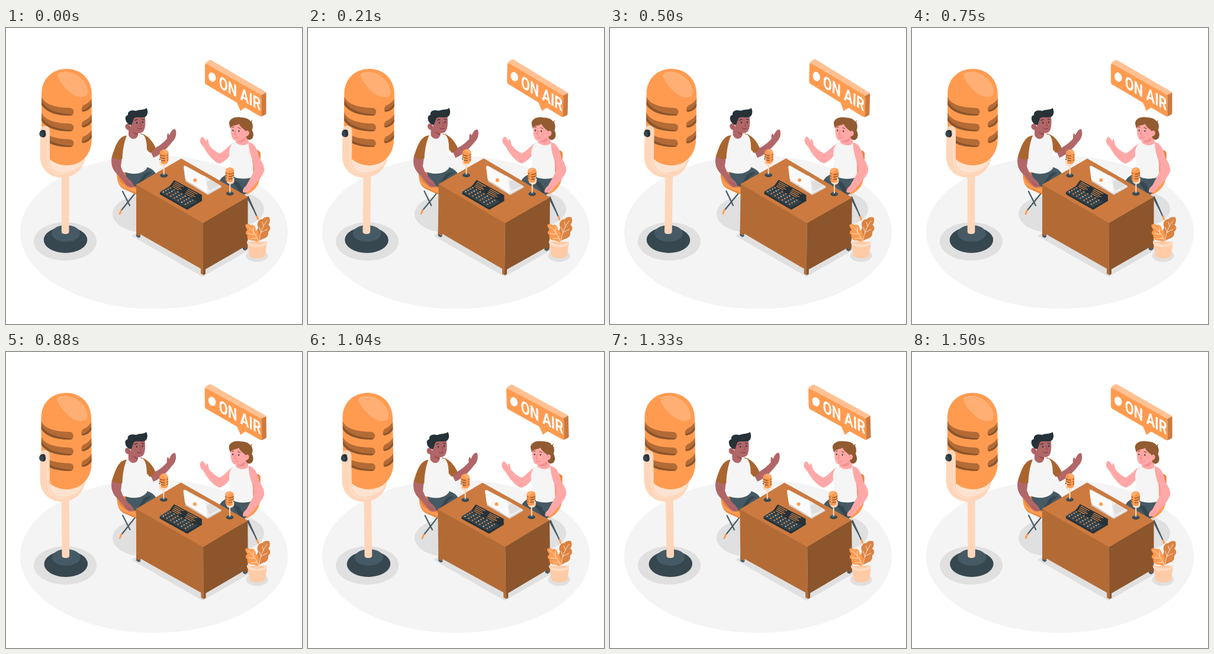
Recreate the animation shown at these times as an HTML page with a canvas. Size 500 px wide and 500 px high, loop 1.54 s.

```html
<!DOCTYPE html>
<html lang="en">
<head>
<meta charset="utf-8">
<title>On air</title>
<style>
  html, body { margin: 0; width: 100%; height: 100%; overflow: hidden; background: #fff; }
  canvas { display: block; width: 500px; height: 500px; }
</style>
</head>
<body>
<canvas id="stage"></canvas>
<script>
const canvas = document.getElementById('stage');
const ctx = canvas.getContext('2d');
const ratio = window.devicePixelRatio || 1;
canvas.width = canvas.height = 500 * ratio;

const LOOP = 1540, STEPS = 37;
const ORANGE = '#ff9b50', LIGHT = '#ffaf73', CREAM = '#ffd6ba';
const TOP = '#cc7a3f', SIDE = '#b36b36', DEEP = '#8c552c';
const INK = '#263238', SLATE = '#37474f', STEEL = '#455a64';
const SHADOW = '#e0e0e0', SHIRT = '#f5f5f5', SLEEVE = '#a9652f';
const MAN = '#b16668', MAN_DARK = '#9a4a4d', WOMAN = '#ffa8a7', WOMAN_DARK = '#f28f8f';

function fill(color, d) {
  ctx.fillStyle = color;
  ctx.fill(new Path2D(d));
}

function line(color, width, d) {
  ctx.strokeStyle = color;
  ctx.lineWidth = width;
  ctx.lineCap = ctx.lineJoin = 'round';
  ctx.stroke(new Path2D(d));
}

function oval(color, x, y, rx, ry = rx, angle = 0) {
  ctx.fillStyle = color;
  ctx.beginPath();
  ctx.ellipse(x, y, rx, ry, angle, 0, Math.PI * 2);
  ctx.fill();
}

function part(x, y, degrees, draw) {
  ctx.save();
  ctx.translate(x, y);
  ctx.rotate(degrees * Math.PI / 180);
  ctx.translate(-x, -y);
  draw();
  ctx.restore();
}

// Rises to 1 at a quarter, falls to -1 at three quarters, returns to 0.
function sway(p) {
  if (p < 0.25) return p * 4;
  return p < 0.75 ? 2 - p * 4 : p * 4 - 4;
}

function floor() {
  oval('#f4f4f4', 250, 345, 226, 129.5);
  oval(SHADOW, 100, 360.5, 53, 32.5);
  oval(SHADOW, 232, 314, 52, 31);
  oval(SHADOW, 385, 306, 51, 30);
  fill(SHADOW, 'M212 351 L332 420 L416 372 L296 302Z');
  oval(SHADOW, 424, 384.5, 18.5, 10.5);
}

function microphone() {
  oval(SLATE, 100.5, 358, 36.8, 22);
  oval(STEEL, 101, 347, 24, 14);
  fill(CREAM, 'M93.8 245 H106.5 V344 Q106.5 348 100.2 348 Q93.8 348 93.8 344Z');
  fill('#ffe3d0', 'M70 215 C70 238 82 249 98 249 C117 247 129 236 134 218Z');
  line('#ffc9a3', 2, 'M132 223 C127 240 112 248 94 248');
  fill(ORANGE, 'M60 112 C60 84 80 69 102.5 69 C126 69 144.7 86 144.7 112 V188 C144.7 214 127 232 103 232 C78 232 60 214 60 188Z');
  ctx.save();
  ctx.beginPath();
  ctx.rect(60, 60, 84.7, 180);
  ctx.clip();
  fill(LIGHT, 'M88 77 C96 71 115 73 128 86 C138 96 141 111 135 115 C129 118 119 117 110 110 C98 101 84 83 88 77Z');
  for (let i = 0; i < 3; i++) {
    ctx.save();
    ctx.translate(0, i * 26.5);
    fill(SIDE, 'M60 116 Q66 134 108 135 C117 136 116 148 108 148 Q72 148 60 130Z');
    fill(DEEP, 'M60 123 Q70 144 113 146 Q111 148 108 148 Q72 148 60 130Z');
    fill(SIDE, 'M146 117 Q141 126 132 130 C127 132 126 143 132 141 Q141 139 146 130Z');
    fill(DEEP, 'M146 125 Q138 138 128 139 Q129 142 132 141 Q141 139 146 130Z');
    ctx.restore();
  }
  ctx.restore();
  fill(CREAM, 'M58 174 C58 162 74 163 74 174 V222 C74 239 87 246 99 244 C117 242 127 234 133 221 C130 239 116 252 96 253 C72 253 58 237 57.5 216Z');
  line('#ffe4d2', 1.2, 'M70.5 170 V221 C70 240 84 249 98 246');
  fill(INK, 'M57.5 174.5 Q62 170 66.5 173.5 L67.5 180 Q66.5 186 61 184.5 Q56 182 57.5 174.5Z');
  oval(SLATE, 60, 179.5, 3.6, 4.7, -0.3);
}

function smallMicrophone(x, y, flip) {
  ctx.save();
  ctx.translate(x, y);
  ctx.scale(0.172 * flip, 0.153);
  ctx.translate(-102, -69);
  microphone();
  ctx.restore();
}

function sign() {
  fill(TOP, 'M389 119 L396 140 L406 131 L404 122Z');
  fill('#ffc193', 'M336 62 Q336 59 339 57 L343 54.5 Q345 53.5 347 54.5 L437 107 Q440 109 439 111 L431 116 L338 64Z');
  fill(TOP, 'M430 114 L439.5 109 V144 Q439.5 146 437 147 L431 149.5Z');
  fill(ORANGE, 'M336 63 Q336 60 340 61.5 L429 112 Q432 114 432 117 V146 Q432 150.5 428 148.5 L404 134.5 L396 139.5 L390 126 L339 96 Q336 94.5 336 91Z');
  oval('#fff', 348.3, 83, 6, 8, -0.35);
  ctx.save();
  ctx.transform(0.75, 0.42, 0, 1, 359.8, 100.5);
  ctx.fillStyle = '#fff';
  ctx.font = 'bold 29px Roboto, sans-serif';
  ctx.fillText('ON AIR', 0, 0);
  ctx.restore();
}

function man() {
  line(STEEL, 2.2, 'M219 278 L194 309 M197 276 L209 300');
  line(ORANGE, 3, 'M194.5 308 L192 314');
  fill('#e6873f', 'M187 240 C187 258 190 268 199 272 L219 281 Q222 281 222 277 V250Z');
  fill(ORANGE, 'M188 247 Q191 263 204 266 L222 272 V279 L199 270 C190 266 188 258 188 247Z');
  fill(STEEL, 'M201 241 C215 247 230 245 238 235 C248 238 254 244 255 252 L224 269 L210 266 Q203 255 201 241Z');
  fill(SLATE, 'M233 247 Q240 243 246 244 L236 252 L228 267 L220 267Z');
  fill(MAN, 'M243 206 C252 204 264 196 272 187 C272 182 272 178 274 178 L276 181 C279 174 282 170 286 171 C289 177 287 187 281 192 C272 204 260 215 249 219Z');
  fill(SLEEVE, 'M227 178 C238 180 247 190 252.5 202 Q250 209 243 211 L235 202Z');
  fill(SHIRT, 'M203 182 L207 180 C212 188 219 187 223 179 L231 180 C237 184 238 196 238 207 V237 C230 248 212 248 200 243 C197 224 196 200 203 182Z');
  fill(MAN, 'M207 165 L223 173 V180 C222 189 211 190 207 181Z');
  fill(MAN_DARK, 'M213 174 Q219 178 223 178 V181 Q217 181 213 174Z');
  fill(MAN, 'M211 150 L234.5 147 C236 158 236 171 231 175.5 C225 180 216 177 211 173Z');
  fill(INK, 'M203 158 C200 150 203 148 206 147 C205 140 212 138 220 140 C226 137 234 139 237.5 135 C241 142 239 149 234 150.5 C226 152 219 149 216 153 L212 164 L207 163Z');
  oval(MAN, 206, 167, 4.5, 5.5, -0.4);
  line(MAN_DARK, 0.9, 'M204 165 Q208 166 208 170');
  line(INK, 1.1, 'M217.5 156 L222 154.5 M229.5 154 L233 155');
  oval(INK, 221, 160, 1.1, 1.5);
  oval(INK, 231, 159, 1.1, 1.5);
  line(MAN_DARK, 1, 'M227 159 L228.5 165 L226 166');
  line('#6f3033', 0.9, 'M222 169 Q226 172 230 169');
  fill(MAN, 'M179 216 C176 230 180 241 190 249 L201 263 C206 271 213 270 216 268 Q215 261 207 255 L198 244 L194 234 L196 218Z');
  line(MAN_DARK, 0.8, 'M202 260 Q207 264 212 266');
  fill(SLEEVE, 'M204 181.5 C189 183 184 202 179 217 Q187 224 196.5 221 C197 208 199 194 204 181.5Z');
}

function woman() {
  line(STEEL, 2.2, 'M409 285 L424 319 M408 287 L420 310');
  line(ORANGE, 3, 'M424 318 L425.5 323');
  fill('#e6873f', 'M416 205 Q428 205 430 211 L429 250 C428 265 421 273 406 281 L394 275Z');
  fill(ORANGE, 'M428 247 C426 259 416 266 403 272 L407 281 C422 274 429 263 428 247Z');
  fill(STEEL, 'M376 246 C366 250 361 255 360 261 L400 285 L413 270 L418 252Z');
  fill(SLATE, 'M379 254 L394 262 L402 276 L397 280Z');
  fill(WOMAN, 'M386 193 C376 198 370 208 361 212 C352 208 346 202 343 197 C342 191 341 187 339 188 L338.5 192 C335 186 332 182 330 185 C326 190 328 196 334 201 C340 213 352 227 361 229 C370 226 378 217 384 207Z');
  fill(SHIRT, 'M385 193 L394 191 L410 193 C417 198 418 213 416.5 224 L418 251 C406 257 386 255 376 247 L379 224 C375 211 377 199 385 193Z');
  fill(WOMAN, 'M389 184 L407 178 L410 194 C405 200 393 199 388 193Z');
  fill(WOMAN_DARK, 'M390 191 Q400 190 405 183 L404 190 Q398 196 390 191Z');
  fill('#8a572f', 'M400 161 L414 170 C420 178 419 188 411 189 Q405 188 405 180Z');
  fill(WOMAN, 'M381 160 C379 170 379 183 384 188.5 C390 193 401 189 406 183 L409 170 L399 158Z');
  fill('#925b31', 'M377 162 C376 154 386 149 396 151 C407 151 412 155 413 158 L416 155 L415 159 C419 166 416 174 412 179 L407 180 L404 173 C400 170 395 166 394 162 C388 165 381 164 379 170Z');
  oval(WOMAN, 407, 178, 3.7, 4.8, 0.3);
  line(WOMAN_DARK, 0.8, 'M405.5 178 Q407 175 409 177');
  oval(INK, 383.5, 173, 1, 1.5);
  oval(INK, 393.5, 174, 1, 1.5);
  line('#7b4927', 1, 'M382 168 L385 167 M392 168 L396 170');
  line('#e27a7b', 0.9, 'M388 173 L386 180 L389 181 M386 185 Q390 187 393 184');
  fill(WOMAN, 'M410 193 C420 194 425 205 428 219 Q438 234 436 242 C431 255 421 263 413 273 Q407 280 400 277 Q399 272 406 266 L419 242 L416 223 C412 212 410 203 410 193Z');
  line(WOMAN_DARK, 0.8, 'M404 274 Q409 272 412 267 M418 223 L420 239');
}

function mixer() {
  fill(INK, 'M260 277 L305 302 L331 288 V292 L306 307 L260 281Z');
  fill(SLATE, 'M260 277 L278 266 L326 292 L305 303Z');
  fill(INK, 'M276 268 L284 257 L331 282 V292 L325 294Z');
  for (let row = 0; row < 4; row++) {
    for (let i = 0; i < 7; i++) {
      const x = 266 + row * 4 + i * 6.2, y = 277 - row * 2.3 + i * 3.45;
      oval((i + row * 2) % 5 ? ORANGE : '#cfd8dc', x, y, 1.3, 0.9);
      line(INK, 0.8, `M${x + 2} ${y + 1.2} l2 1.1`);
    }
  }
  for (let i = 0; i < 4; i++) {
    const x = 285.5 - i * 1.6, y = 260.5 + i * 2.4, short = i % 2 * 3;
    line(ORANGE, 1, `M${x} ${y} l${14 - short} ${7.6 - short * 0.54} M${x + 22} ${y + 11.8} l${15 - short} ${8 - short * 0.54}`);
  }
}

function laptop() {
  fill('#d5d5d5', 'M303 257 L340 279 L364 267 V269 L341 282 L303 259Z');
  fill('#f0f0f0', 'M304 256 L334 249 L364 267 L340 280Z');
  fill('#dedede', 'M339 260 L345 256 L361 266 L343 275Z');
  fill('#fafafa', 'M300 235 Q300 232 303 233 L336 251 Q338 252 338.5 255 L341 279 L305 258 Q303 257 302.5 254Z');
  line('#e0e0e0', 0.8, 'M301 234 Q301 232 303 233 L336 251 Q338 252 338.5 255 L341 279');
  oval(ORANGE, 319.3, 257, 3);
}

function desk() {
  fill(STEEL, 'M220 342 H227 V353 L224 354.5 L220 352Z M400 364 H408 V373 L404 376 L400 374Z');
  fill(SIDE, 'M220 264 L333 328 V417 L329 415 V406.5 L226 348 V352 L220 349Z');
  fill(DEEP, 'M333 328 L408.5 285 V371 L403 374 V369.5 L337 407.5 V415.5 L333 417.5Z');
  fill(TOP, 'M296 220.5 L408.5 285 L333 329.5 L220 264.5Z');
  laptop();
  mixer();
  smallMicrophone(267, 205, 1);
  smallMicrophone(378, 235.5, -1);
}

function plant() {
  fill('#db8443', 'M427 360 C421 349 424 342 426 337 C422 329 428 322 433 323 C437 318 443 319 445 320 C447 327 445 330 443 332 C448 336 447 341 443 344 C444 351 440 355 434 356Z');
  line('#ffe6d4', 0.9, 'M428 360 C428 347 434 335 441 325 M431 346 L428 337 M431 345 L441 340 M435 335 L433 328');
  fill(ORANGE, 'M427 362 C428 351 427 343 422 341 C422 334 417 331 413 333 C409 330 406 331 404 333 C405 337 406 339 408 341 C403 345 405 349 408 350 C406 355 411 360 417 359Z');
  line('#fff0e4', 0.9, 'M427 362 C423 350 416 340 408 335 M418 347 L418 337 M419 349 L409 347 M423 355 L414 356');
  fill('#ffcba6', 'M408 361 L411 384 C413 391 436 391 438 384 L441 361Z');
  fill('#ffdcc4', 'M407 358 C407 362 416 366 424 366 C433 366 441 362 441 358 V363 C440 368 432 370 424 370 C416 370 408 368 407 363Z');
}

function draw() {
  const step = Math.floor(performance.now() % LOOP / LOOP * STEPS);
  const tilt = sway(step / STEPS);
  ctx.setTransform(ratio, 0, 0, ratio, 0, 0);
  ctx.fillStyle = '#fff';
  ctx.fillRect(0, 0, 500, 500);
  floor();
  part(388, 100, tilt * 2.2, sign);
  part(233, 225, tilt * 1.1, man);
  part(381, 237, tilt * 1.1, woman);
  part(314, 319, tilt * 1.1, desk);
  part(425, 354, tilt, plant);
  part(101, 225, tilt * 1.2, microphone);
  requestAnimationFrame(draw);
}

draw();
</script>
</body>
</html>
```
